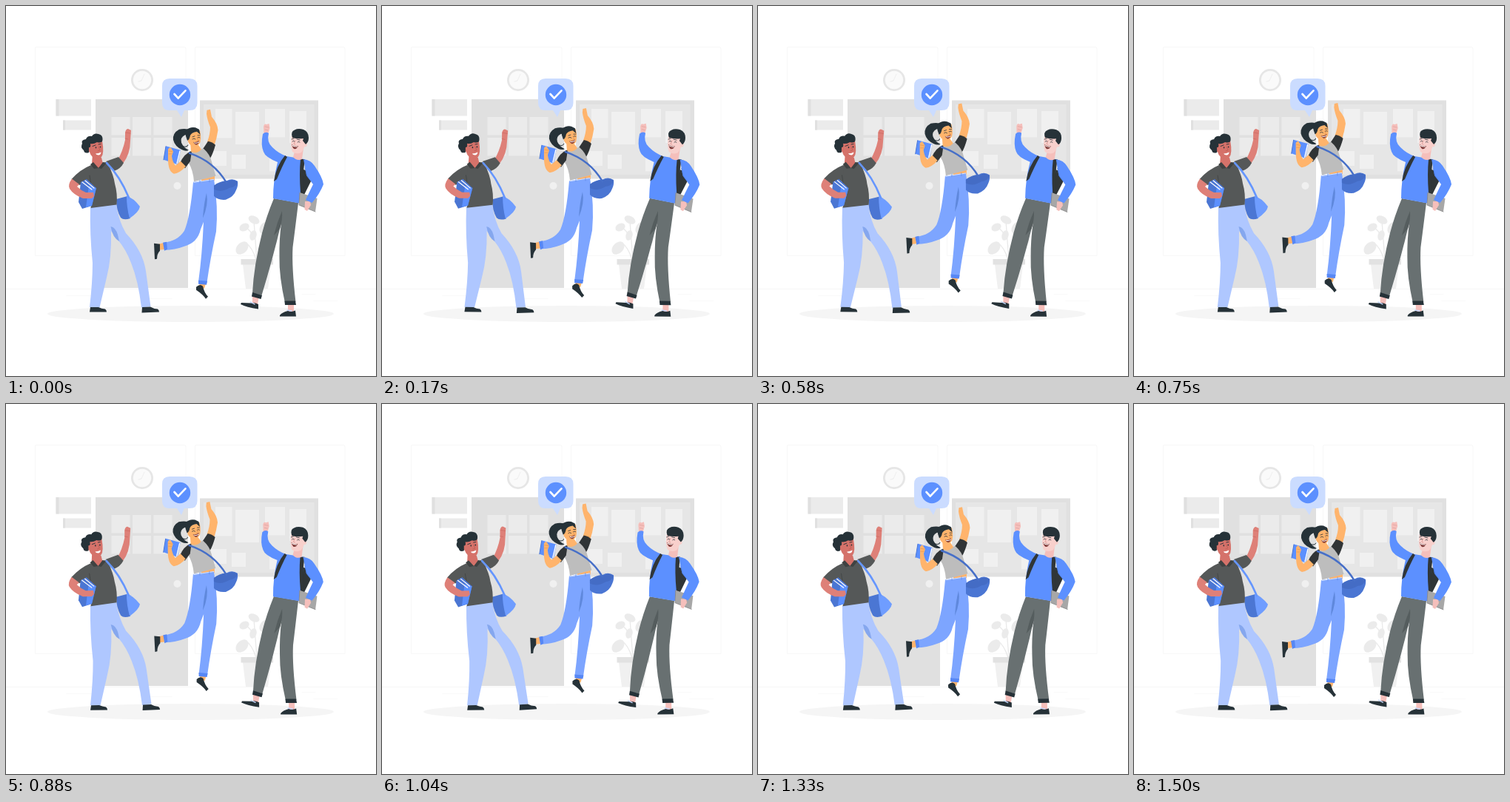
An HTML page with a canvas that plays this animation: 500x500 px, repeating every 1.54 s.

```html
<!DOCTYPE html>
<html lang="en">
<head>
<meta charset="utf-8">
<title>Classroom cheer</title>
<style>
html, body { margin: 0; width: 100%; height: 100%; overflow: hidden; background: #fff; }
canvas { display: block; width: 100vw; height: 100vh; }
</style>
</head>
<body>
<canvas id="stage"></canvas>
<script>
const LOOP = 1540;
const SWAY = 0.0175;
const BLUE = '#5c90ff', DEEP = '#4b76d3', INK = '#263238', WHITE = '#fff';
const canvas = document.getElementById('stage');
const ctx = canvas.getContext('2d');
const dpr = window.devicePixelRatio || 1;
canvas.width = canvas.height = 500 * dpr;

const paths = new Map();
function pathOf(d) {
  if (!paths.has(d)) paths.set(d, new Path2D(d));
  return paths.get(d);
}
function fill(color, d) {
  ctx.fillStyle = color;
  ctx.fill(pathOf(d));
}
function line(color, width, d) {
  ctx.strokeStyle = color;
  ctx.lineWidth = width;
  ctx.stroke(pathOf(d));
}
function box(color, x, y, right, bottom) {
  ctx.fillStyle = color;
  ctx.fillRect(x, y, right - x, bottom - y);
}
function oval(color, x, y, rx, ry = rx, angle = 0) {
  ctx.fillStyle = color;
  ctx.beginPath();
  ctx.ellipse(x, y, rx, ry, angle, 0, Math.PI * 2);
  ctx.fill();
}
function posed(draw, x, y, angle, dy = 0) {
  ctx.save();
  ctx.translate(x, y + dy);
  ctx.rotate(angle);
  ctx.translate(-x, -y);
  draw();
  ctx.restore();
}

function room() {
  line('#f8f8f8', 1, 'M41 55.5H241Q243 55.5 243 58V337.5H39.5V57Q39.5 55.5 41 55.5Z M257 55.5H456Q458 55.5 458 58V337.5H255.5V57Q255.5 55.5 257 55.5Z');
  line('#f3f3f3', 0.7, 'M0 382.500H500');
  line('#f6f6f6', 0.7, 'M400 389.500H418 M416 398.500H448 M186 395.500H224 M82 391.500H118');

  oval('#e6e6e6', 184, 100, 15);
  oval('#fafafa', 184, 100, 12.2);
  line('#ebebeb', 0.8, 'M187 92L183 101L179 102');

  box('#ebebeb', 67.5, 126, 115, 148.5);
  box('#e0e0e0', 67.5, 126, 71.5, 148.5);
  box('#ebebeb', 77, 154.5, 115, 167.5);
  box('#e0e0e0', 77, 154.5, 80, 167.5);

  box('#e0e0e0', 121, 126, 246, 381);
  for (const x of [142.5, 171, 199.5])
    for (const y of [150, 178]) box('#ebebeb', x, y, x + 25, y + 24.5);
  oval('#f0f0f0', 231.5, 243, 5);

  box('#e0e0e0', 262, 127.5, 422, 233.5);
  box('#e6e6e6', 267, 133, 416.5, 228);
  const notes = [[283, 139, 305.5, 178.5], [310, 143, 342, 187], [350, 139, 377, 177.5],
    [383, 142, 406, 185], [275, 196, 298, 216], [305, 201, 324, 220], [356, 206, 380, 223.5]];
  for (const note of notes) box('#f0f0f0', ...note);

  line('#e9e9e9', 1.3, 'M339 343Q337 318 335 291 M338 343Q333 326 324 320 M334 312Q331 303 323 299 M340 343Q345 320 356 310');
  const leaves = [[335, 289, 8, 5, 0.5], [322, 299, 7, 5, -0.5], [319, 327, 10, 7, -0.8],
    [334, 310, 4.5, 7, 0.3], [348, 300, 5, 8, 0.4], [358, 317, 8, 11, 0.3]];
  for (const leaf of leaves) oval('#ebebeb', ...leaf);
  fill('#f0f0f0', 'M320 349H358L354 382H324Z');
  box('#e2e2e2', 317.5, 342, 361, 349.5);

  oval('#f5f5f5', 249.5, 416, 193.5, 11);
}

function bubble() {
  fill('#cbdcff', 'M221 98H248Q258.500 98 258.500 108V131Q258.500 141 248 141H241L237 150L231 141H221Q211 141 211 131V108Q211 98 221 98Z');
  oval(BLUE, 235, 120, 14.2);
  line(WHITE, 2.6, 'M227.500 119L232.700 124.700L242.500 114.300');
}

function leftFriend() {
  const arm = '#de8078', face = '#d5726a', shirt = '#555858';
  fill(arm, 'M150 210Q158 196 161 181L161 171Q162 166 165 166L169 168L168 182Q168 200 158 213Z');
  line('#c8655e', 0.6, 'M162 171L168 172 M161 179L165 180');
  fill(shirt, 'M135 210L152 204L159 212Q155 220 146 223Z');

  fill('#afc7ff', 'M114 272L149 268Q152 290 162 307Q185 331 189 358L195.500 406L183 407.500Q179 372 169 347Q162 329 152 317L142 304Q143 340 136 367L126.500 407.500L113 407Q117 373 117 347Q113 308 114 272Z');
  fill('#85a7ee', 'M141.500 298Q148 299 151 309L153 318Q144 313 141.500 298Z');
  fill(INK, 'M114 407L125 407Q129 409 134 409.500Q136 411 136 413.500H113Z M184 407L195 406.500Q199 409 205 409.500Q207 411 207 413.500L183.500 414.500Z');

  fill(DEEP, 'M149 261L164 257L168 287Q159 290 155 286Q149 276 149 261Z');
  fill('#6f9dff', 'M163 257Q172 259 181 271Q180 278 167 287Q163 272 163 257Z');

  fill(shirt, 'M112 217Q122 211 137 211Q146 230 147 240Q151 254 149.500 268.500L114.500 273Q119 253 113 239Z');
  fill(shirt, 'M115 215Q100 221 88.500 234L99 242L115 237Z');
  line('#3d4040', 0.7, 'M113 229Q114 240 117 249');
  line('#6596ff', 2.6, 'M136 212Q154 230 166 259');

  fill(face, 'M117 199L129 205L131 213L125 219L116 214Z');
  fill('#3f4242', 'M114 214L118 211L125 219L119 220Z M131 211L135 213L129 220L125 219Z');

  fill(DEEP, 'M101 238L109 234L122 246L116 270L103 274L98 265Z');
  fill(BLUE, 'M112 243L122 246L116 270L108 272Z');
  line(WHITE, 1.2, 'M103 238L116 248 M107 236L119 246');
  fill(arm, 'M89 233.500Q83 242 86 247Q91 255 104 260L116 260L119 257L118 252L108 252Q101 249 96 244L99 241Z');

  fill(face, 'M111 183L130 182Q133 199 129 204Q124 209 117 204Q111 199 111 183Z');
  oval(face, 111, 194, 3, 3.5);
  fill(INK, 'M112 198Q106 200 105 195Q100 191 103 186Q101 181 108 180Q110 175 116 176Q119 171 125 173Q131 174 130.500 181Q130 186 123 184Q118 187 114 186Q115 192 112 191Z');
  line(INK, 0.9, 'M117 189.500L121 188 M125 187L128 186.500');
  oval(INK, 121.5, 191.3, 0.8, 1.1);
  oval(INK, 127.5, 190.5, 0.8, 1.1);
  line('#b95850', 0.7, 'M125 190L127 195L124 196');
  fill(WHITE, 'M121 199.500Q125 199.500 128.500 197.500Q128 201.500 125 201.500Q122 201.500 121 199.500Z');
}

function girl() {
  const skin = '#ffb46c', sleeve = '#303436', jeans = '#7da5ff';
  fill(INK, 'M250 168Q243 165 234 167Q225 172 226 181Q228 190 238 194.500Q243 197 247 195Q240 192 237 185Q235 178 242 174.500L249 176Z');
  line(INK, 1, 'M238 189Q244 192 246 188');

  fill(skin, 'M272 184Q276 173 276 164Q272 154 271 146L271.500 141L276 140L278 150Q286 159 286.500 168Q285 179 281 190Z');
  fill(sleeve, 'M265 195L273 183Q279 184 283 188Q280 199 276 206Z');

  fill(skin, 'M206 322L214 320L216 329L207 330Z M262 374L270 375L268 382L261 380Z M264 230L282 227V236L264 237Z');
  fill(INK, 'M200 321L208 322L208 331Q204 335 204 342L201 342.500Z M257 380Q262 375 266 379Q268 388 273 393L270 396Q266 390 257 384Z');
  fill(jeans, 'M253 238L281 234Q287 272 284 305Q276 342 271.500 374L260 373Q265 337 267 292L263 302Q259 320 241 325Q228 330 214 330L213 320Q232 318 241 304Q249 285 253 238Z');
  fill('#5f88dc', 'M271 253Q274 268 266 287Q267 269 271 253Z');
  line('#dfe9ff', 0.9, 'M254 238.500L281 234.500');
  line('#5e8ae6', 0.7, 'M262 235V239 M275 234V238');
  fill('#5687f5', 'M260 371L272 372L271 377L260 376Z M212 320L217 319L218 329L214 331Z');

  fill(DEEP, 'M281 243Q288 237 298 236.500Q306 232 313 237Q314 243 311 249Q308 258 297 262Q286 263 281 257Z');
  fill('#446cc5', 'M281 243Q292 236 300 237Q307 233 313 238Q311 245 302 246Q291 253 281 248Z');

  fill('#bdbdbd', 'M247 197L267 193Q276 201 278 211L283.500 230L254 237.500Q253 222 246 211Z');
  fill(sleeve, 'M251 196Q240 200 235 213L242 219.500L249 210Q250 204 251 196Z');
  fill(skin, 'M249 184L260 188L264 194Q258 201 250 197Z');
  line('#466fc8', 2.5, 'M248 199Q281 210 298 239');

  fill(BLUE, 'M216 189.500L236 195L232 214.500L213 208Z');
  line(WHITE, 1.4, 'M235 196L231 213');
  line(DEEP, 1, 'M216 190L213 208');
  fill(skin, 'M219 194Q221 190 223 192L226 197L224 203Q225 211 229 216L236 210L243 217Q235 226 227 227Q219 224 219 207Z');
  line('#dc914e', 0.6, 'M220 196L225 197 M220 200L224 200');

  fill(skin, 'M245 174L262 168Q265 183 261 187Q254 192 248 187Q244 182 245 174Z');
  fill(INK, 'M243 168Q249 163 256 164.500L261 167L262.500 174L258 170Q251 171 249 175Q248 181 245 182L243 176Z');
  line(INK, 0.8, 'M252 177L255 176 M259 175L262 175 M252 180Q254 178 256 180 M259 178Q261 177 262 178');
  line('#dc914e', 0.7, 'M258 178L260 181L258 182');
  fill('#8b4035', 'M253 184Q257 185 261 182Q261 187 257 188Q254 187 253 184Z');
  line(WHITE, 1, 'M254.500 185Q258 186 260.500 184');
}

function rightFriend() {
  const hand = '#f5bfbb', face = '#f8d0cc', trousers = '#687071';
  fill(hand, 'M348.500 173L348 163Q349 158 352 160L355.500 159L356.500 165L354 173Z');
  line('#d99b97', 0.6, 'M350 163L355 164 M350 167L354 168');
  fill(hand, 'M333 391L342 392L340 403L333 402Z M381 402H389V414H381Z');
  fill(INK, 'M318 401L331 401.500Q335 400 341 403V409.500Q325 407 317 403Z M370 418Q373 414 381 412Q386 414 391 411.500L392 419.500H370Z');
  line('#c6d9ff', 1.4, 'M330 400L336 403 M380 411L386 412');

  fill(trousers, 'M362 260L395 266Q391 299 387.500 326Q386 353 391.500 400L377 401Q369 365 369.500 340Q369 317 372 293Q361 340 345.500 391L333 388Q335 350 346 307Q352 284 362 260Z');
  fill('#555d5e', 'M373 277Q374 289 370 301L362 310Q366 293 373 277Z');
  fill(INK, 'M333 387L346 391L344.500 396L332 392.500Z M376.500 398.500H391L392 404H377Z');

  fill('#303638', 'M399 220L411 224L412 237L403 255L396 252Z');
  fill(BLUE, 'M347 173Q351 169 355 172Q352 184 360 191Q368 199 379 203L403 207Q402 229 396 266.500L361 260Q361 235 367 211Q350 204 348 197Q344 188 347 173Z');
  fill('#303638', 'M377 202L380 204Q373 217 366 234L362 237Q365 216 377 202Z M398 207H404Q400 230 403 253L398 252Q396 227 398 207Z');

  fill('#a7a7a7', 'M397 252L420.500 260L418 278L396 269Z');
  line('#858585', 0.8, 'M397 252L396 269L418 278');
  fill(hand, 'M404 264L411 264L412 269L407 277L403.500 275Z');
  fill(BLUE, 'M402 207Q412 208 417 216Q428 232 429 241Q424 254 413.500 266L405 262Q411 249 415 241L406 229Z');
  line('#477ae5', 0.6, 'M404 219L407 230L411 235');

  fill(hand, 'M390 197L402 192L400 207Q393 210 388 204Z');
  fill(face, 'M386 176L404 178Q406 190 399 198Q392 201 387 197Q384 190 386 176Z');
  oval(face, 404, 187, 2.8, 3.3);
  fill(INK, 'M387 178Q384 170 390 167.500Q395 165 402 167Q409 170 409 178Q409 184 405 187L401 182L402 179Q394 180 387 178Z');
  line(INK, 0.8, 'M386 180L389 179 M393 180L397 181 M387 183Q388 181 390 183 M394 184Q395 182 397 184');
  line('#d58d89', 0.7, 'M391 182L389 186L391 187');
  fill('#813d3b', 'M386 187Q390 190 395 189Q393 194 389 193Q387 191 386 187Z');
  line(WHITE, 1, 'M387 188.500Q390 190.500 393.500 190');
}

function render(now) {
  const turn = Math.PI * 2 * (now % LOOP) / LOOP;
  const sway = SWAY * Math.sin(turn);
  const lift = (1 - Math.cos(turn + 0.25)) / 2;
  ctx.setTransform(dpr, 0, 0, dpr, 0, 0);
  ctx.lineCap = ctx.lineJoin = 'round';
  box(WHITE, 0, 0, 500, 500);
  room();
  posed(leftFriend, 132, 272, sway);
  posed(rightFriend, 378, 266, sway);
  posed(girl, 262, 262, -0.006 * lift, -9 * lift);
  bubble();
}

const start = performance.now();
function tick() {
  render(performance.now() - start);
  requestAnimationFrame(tick);
}
tick();
</script>
</body>
</html>
```
